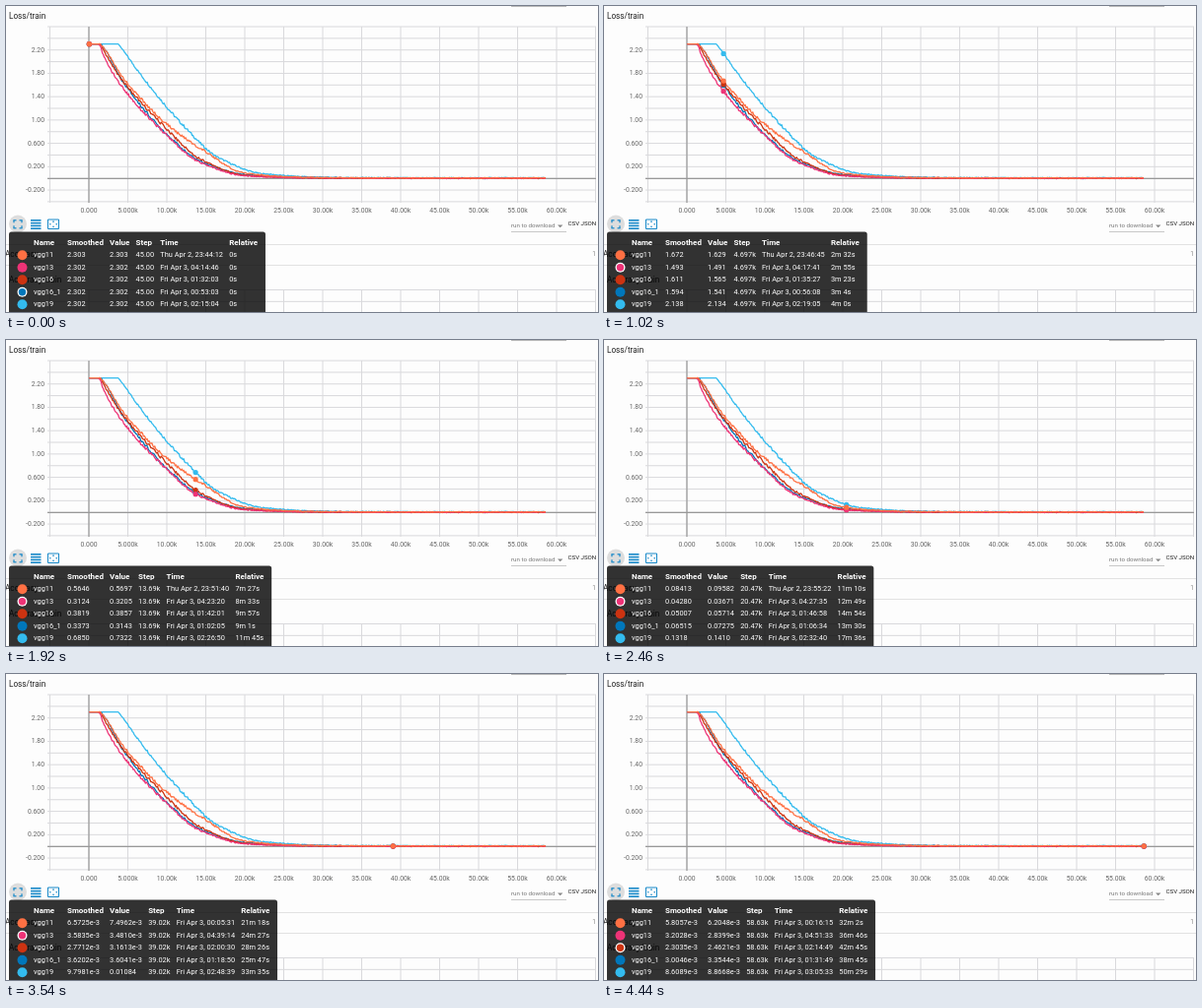
These frames come from a looping animation (600x311 px, 4740 ms). An HTML page with a canvas:

```html
<!DOCTYPE html>
<html lang="en">
<head>
<meta charset="utf-8">
<title>Loss curves</title>
<style>
  html, body { margin: 0; height: 100%; overflow: hidden; background: #fdfdfd; }
  canvas { display: block; }
</style>
</head>
<body>
<canvas id="stage" width="600" height="311"></canvas>
<script>
const ctx = document.getElementById('stage').getContext('2d');
const LOOP = 4740, TICK = 60;
const FIRST = .045, LAST = 58.63; // training steps in thousands
const BLUE = '#1688c8', GRID = '#d9d9dc', AXIS = '#999', LABEL = '#666';

// Where the cursor is (thousands of steps) at a few moments (ms)
const cursorTimes = [420, 660, 960, 1380, 2040, 2460, 3120, 3960, 4200, 4440];
const cursorSteps = [FIRST, 2.092, 4.05, 9.912, 14.7, 20.47, 31.51, 48.32, 58, LAST];

// Every run stays flat until its onset, falls through a few losses, then decays to a floor
const offsets = [0, .7, 3, 8.6, 13, 19.2];
const runs = [
  { name: 'vgg11', color: '#ff7043', onset: 1.35, losses: [2.303, 2.21, 1.73, .937, .51, .084],
    floor: .0058, start: '2020-04-02T23:44:12.6Z', duration: 1922.5 },
  { name: 'vgg13', color: '#ee3377', onset: 1.25, losses: [2.302, 2.08, 1.57, .757, .275, .043],
    floor: .0032, start: '2020-04-03T04:14:46.6Z', duration: 2206.5 },
  { name: 'vgg16', color: '#cc3311', onset: 1.35, losses: [2.302, 2.15, 1.67, .852, .33, .05],
    floor: .0023, start: '2020-04-03T01:32:03.6Z', duration: 2565.5 },
  { name: 'vgg16_1', color: '#0077bb', onset: 1.4, losses: [2.302, 2.2, 1.65, .757, .29, .065],
    floor: .003, start: '2020-04-03T00:53:03.6Z', duration: 2325.5 },
  { name: 'vgg19', color: '#33bbee', onset: 3.7, losses: [2.302, 2.19, 1.77, .88, .35, .076],
    floor: .0086, start: '2020-04-03T02:15:04.6Z', duration: 3029.1 }
];
const paintOrder = [...runs].reverse();

const px = step => 84 + 7.9 * step;
const py = loss => 175.2 - 59.3 * loss;

// Monotone cubic curve through the points, level at both ends
function smooth(xs, ys, x) {
  const last = xs.length - 1;
  if (x <= xs[0]) return ys[0];
  if (x >= xs[last]) return ys[last];
  const i = xs.findIndex(v => v > x) - 1;
  const secant = j => (ys[j + 1] - ys[j]) / (xs[j + 1] - xs[j]);
  const slope = j => {
    if (j === 0 || j === last) return 0;
    const a = secant(j - 1), b = secant(j);
    return a * b > 0 ? 2 * a * b / (a + b) : 0;
  };
  const h = xs[i + 1] - xs[i], u = (x - xs[i]) / h, w = 1 - u;
  return ys[i] * w * w * (1 + 2 * u) + ys[i + 1] * u * u * (3 - 2 * u)
    + h * u * w * (w * slope(i) - u * slope(i + 1));
}

function lossAt(run, step) {
  const past = step - run.onset, end = offsets[offsets.length - 1];
  const loss = smooth(offsets, run.losses, past);
  return past < end ? loss : run.floor + (loss - run.floor) * Math.exp((end - past) / 4);
}

function noise(n) {
  const s = Math.sin(n * 12.9898) * 43758.5453;
  return (s - Math.floor(s)) * 2 - 1;
}

function rawAt(run, step) {
  const loss = lossAt(run, step);
  return loss * (1 + .15 * (1 - loss / run.losses[0]) * noise(step + run.onset));
}

// ---- drawing helpers ----
function line(x1, y1, x2, y2, color, width = 1) {
  ctx.strokeStyle = color;
  ctx.lineWidth = width;
  ctx.beginPath();
  ctx.moveTo(x1, y1);
  ctx.lineTo(x2, y2);
  ctx.stroke();
}

function setFont(size, weight) {
  ctx.font = `${weight} ${size}px Roboto, sans-serif`;
}

function text(str, x, y, size, color, align = 'left', weight = 400) {
  setFont(size, weight);
  ctx.fillStyle = color;
  ctx.textAlign = align;
  ctx.textBaseline = 'middle';
  ctx.fillText(str, x, y);
}

function disc(x, y, r, color) {
  ctx.fillStyle = color;
  ctx.beginPath();
  ctx.arc(x, y, r, 0, 2 * Math.PI);
  ctx.fill();
}

// ---- page parts ----
function drawGrid(top, bottom) {
  for (let y = top; y < bottom + 1; y += 11.86) line(42, y, 598, y, GRID);
  for (let k = -5; k <= 65; k += 5) line(px(k), top, px(k), bottom + 2, GRID);
}

function drawCurve(run, seed) {
  ctx.strokeStyle = run.color;
  ctx.lineWidth = 1.3;
  ctx.lineJoin = 'round';
  ctx.beginPath();
  for (let step = FIRST, i = 0; step <= LAST; step += .12, i++) {
    const loss = lossAt(run, step);
    const wobble = step < run.onset ? 0 : .008 + .016 * Math.sin(Math.PI * loss / 2.31);
    ctx.lineTo(px(step), py(loss + wobble * noise(i + seed * 700)));
  }
  ctx.stroke();
}

function drawChart() {
  text('Loss/train', 3, 11, 8.2, '#222');
  drawGrid(21, 198);
  line(42, 175.3, 598, 175.3, AXIS, 1.2);
  line(84, 21, 84, 200, AXIS, 1.2);
  for (let v = -.2; v < 2.3; v += .4) {
    text(v.toFixed(v < .9 ? 3 : 2), 39, py(v), 6.8, LABEL, 'right');
  }
  for (let k = 0; k <= 60; k += 5) {
    const label = k ? k.toPrecision(4) + 'k' : '0.000';
    text(label, px(k), 208, 6.8, LABEL, 'center');
  }
  paintOrder.forEach(drawCurve);
}

function drawControls() {
  disc(12, 221.5, 9, '#ddd');
  for (const sx of [-1, 1]) for (const sy of [-1, 1]) {
    const x = 12 + sx * 4, y = 221.8 + sy * 4;
    line(x - sx * 2.5, y, x + sx * .6, y, BLUE, 1.2);
    line(x, y, x, y - sy * 2.5, BLUE, 1.2);
  }
  for (let i = 0; i < 4; i++) line(25, 217.8 + i * 2.8, 35.5, 217.8 + i * 2.8, BLUE, 1.6);
  ctx.lineWidth = 1;
  ctx.strokeRect(42.5, 217, 11, 9.5);
  for (const side of [-1, 1]) {
    disc(48 + side * 3.2, 221.75, .8, BLUE);
    disc(48, 221.75 + side * 2.6, .8, BLUE);
  }

  text('run to download', 512, 223.6, 6.2, '#777');
  line(512, 229.5, 568, 229.5, '#bbb', .8);
  ctx.fillStyle = '#888';
  ctx.beginPath();
  ctx.moveTo(559, 222.5);
  ctx.lineTo(564.4, 222.5);
  ctx.lineTo(561.7, 225.2);
  ctx.fill();
  text('CSV', 569.5, 221.6, 6.2, '#222');
  text('JSON', 582.5, 221.6, 6.2, '#222');
  line(512, .5, 568, .5, '#bbb');
}

function drawNextSection() {
  line(0, 242.5, 600, 242.5, '#e2e2e2');
  line(0, 263.5, 600, 263.5, '#e2e2e2');
  text('Accuracy', -1, 253, 8.2, '#222');
  text('1', 598, 252, 6.5, '#888', 'right');
  text('Accuracy/train', 3, 279, 8.2, '#222');
  drawGrid(288.5, 311);
}

// ---- tooltip ----
const formatLoss = v => v < .01 ? v.toExponential(4) : v.toPrecision(4);
const formatStep = k => k < 1 ? (k * 1000).toPrecision(4) : k.toPrecision(4) + 'k';

function formatElapsed(seconds) {
  const s = Math.floor(seconds);
  return (s >= 60 ? Math.floor(s / 60) + 'm ' : '') + s % 60 + 's';
}

function formatDate(start, seconds) {
  const utc = new Date(Date.parse(start) + seconds * 1000).toUTCString();
  return `${utc.slice(0, 3)} Apr ${+utc.slice(5, 7)}, ${utc.slice(17, 25)}`;
}

function drawTooltip(step) {
  const header = ['Name', 'Smoothed', 'Value', 'Step', 'Time', 'Relative'];
  const rows = runs.map(run => {
    const seconds = run.duration * (step - FIRST) / (LAST - FIRST);
    return [run.name, formatLoss(lossAt(run, step)), formatLoss(rawAt(run, step)),
      formatStep(step), formatDate(run.start, seconds), formatElapsed(seconds)];
  });

  // Columns are as wide as their widest cell
  const widest = (cells, size, weight) => {
    setFont(size, weight);
    return Math.max(...cells.map(cell => ctx.measureText(cell).width));
  };
  const columns = [28, 62];
  for (let c = 1; c < 5; c++) {
    const cells = widest(rows.map(row => row[c]), 7.4, 400);
    columns.push(columns[c] + Math.max(cells, widest([header[c]], 8, 700)) + 6.2);
  }

  ctx.fillStyle = 'rgba(0, 0, 0, .8)';
  ctx.beginPath();
  ctx.roundRect(3, 229.5, columns[5] + 33.8, 100, 2.5);
  ctx.fill();

  header.forEach((title, c) => text(title, columns[c], 240.8, 8, '#fff', 'left', 700));
  const nearest = step < .5 ? 3 : step < 45 ? 1 : 2;
  rows.forEach((row, r) => {
    const y = 253.3 + r * 12.5;
    disc(16.5, y, 5, r === nearest ? '#fff' : runs[r].color);
    if (r === nearest) disc(16.5, y, 3.7, runs[r].color);
    row.forEach((cell, c) => text(cell, columns[c], y, 7.4, '#fff'));
  });
}

function draw(now) {
  const t = Math.floor((now % LOOP) / TICK) * TICK;
  const step = smooth(cursorTimes, cursorSteps, t);
  ctx.fillStyle = '#fdfdfd';
  ctx.fillRect(0, 0, 600, 311);
  drawChart();
  for (const run of paintOrder) disc(px(step), py(lossAt(run, step)), 2.6, run.color);
  drawControls();
  drawNextSection();
  drawTooltip(step);
}

const begin = performance.now();
function frame() {
  draw(performance.now() - begin);
  requestAnimationFrame(frame);
}
frame();
</script>
</body>
</html>
```
